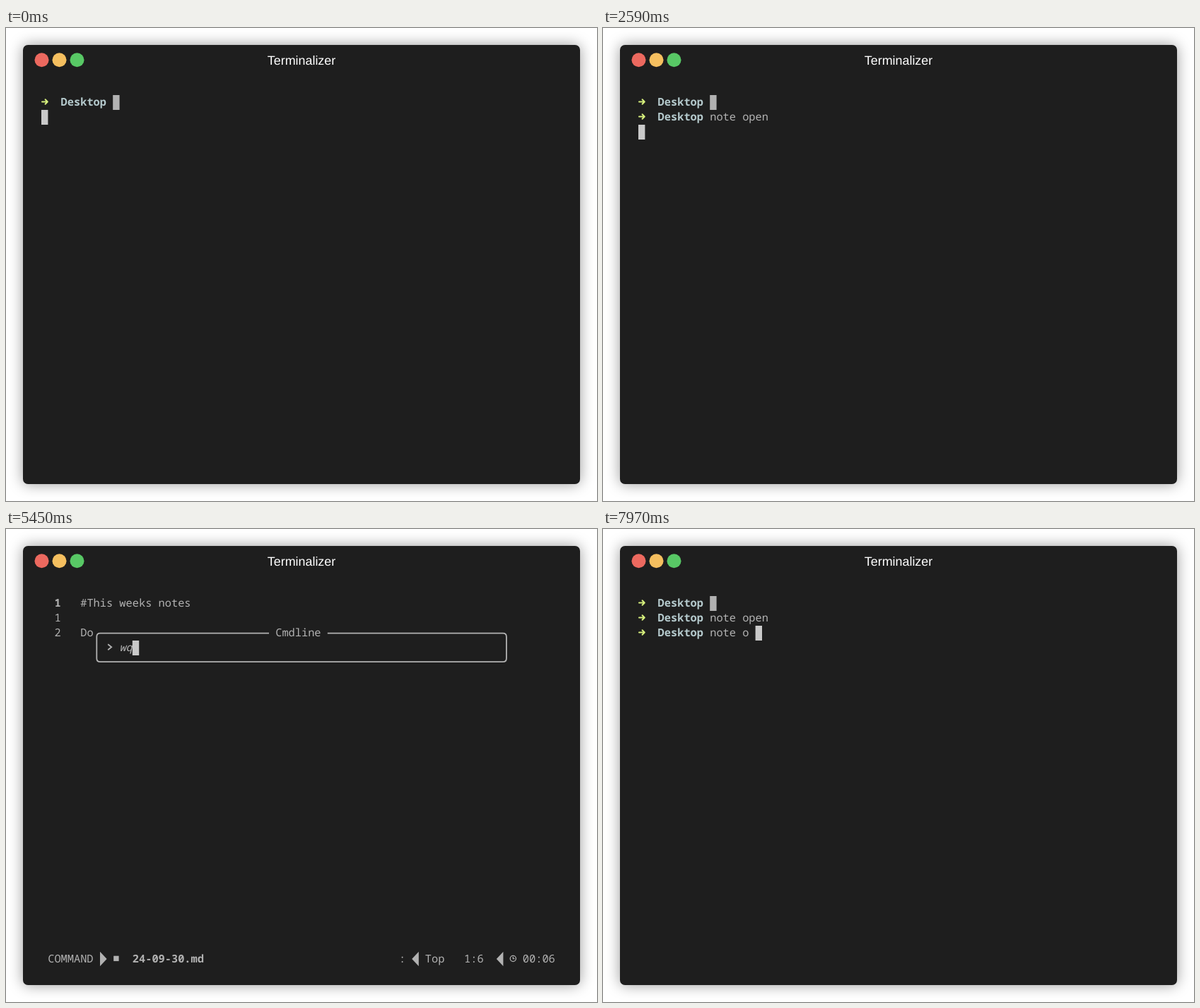
Write an HTML page that moves like this. It is 836 px wide and 670 px high and loops after 8 s.

```html
<!DOCTYPE html>
<html lang="en">
<head>
<meta charset="utf-8">
<title>Terminal notes</title>
<style>
  html, body { margin: 0; width: 100%; height: 100%; overflow: hidden; background: #fff; }
  .window {
    position: absolute; left: 24px; top: 24px; width: 788px; height: 622px;
    border-radius: 7px; background: #1e1e1e; box-shadow: 0 0 20px rgba(0, 0, 0, .4);
  }
  svg { position: absolute; left: 0; top: 0; display: block; }
  text { white-space: pre; text-rendering: geometricPrecision; }
  .title { font: 17.9px "Liberation Sans", Arial, sans-serif; fill: #fff; text-anchor: middle; }
  #screen { font: 15.33px "Noto Sans Mono", "DejaVu Sans Mono", monospace; fill: #b2b2b2; }
  .bold { font-weight: 700; }
  .italic { font-style: italic; }
  .dir { font-weight: 700; fill: #b5cacd; }
  .dark { fill: #1e1e1e; }
  .arrow { fill: none; stroke: #d5ee7c; stroke-width: 2; stroke-linecap: round; stroke-linejoin: round; }
  .line { fill: none; stroke: #b2b2b2; stroke-width: 1.8; }
  .thin { fill: none; stroke: #b2b2b2; stroke-width: 1.3; }
</style>
</head>
<body>
<div class="window"></div>
<svg width="836" height="670" viewBox="0 0 836 670">
  <circle cx="50.5" cy="45.3" r="10" fill="#ec695f"/>
  <circle cx="75.5" cy="45.3" r="10" fill="#f5bf5f"/>
  <circle cx="100.5" cy="45.3" r="10" fill="#58c865"/>
  <text class="title" x="418" y="52">Terminalizer</text>
  <g id="screen"></g>
</svg>
<script>
const LOOP = 8000, CELL = 9.2, ROW = 21, LEFT = 50, TOP = 95, STATUS_ROW = 24;
const screen = document.getElementById('screen');

const px = col => LEFT + col * CELL;
const py = row => TOP + row * ROW;

const text = (col, row, str, cls = '') =>
  `<text class="${cls}" x="${px(col)}" y="${py(row) + 14.8}">${str}</text>`;
const block = (col, row, fill = '#c9c9c9') =>
  `<rect x="${px(col)}" y="${py(row)}" width="9.4" height="21" fill="${fill}"/>`;
const path = (cls, d) => `<path class="${cls}" d="${d}"/>`;

// Number of key times already reached
const count = (t, times) => times.filter(k => t >= k).length;

function prompt(row) {
  const x = px(0), y = py(row) + 9.5;
  return path('arrow', `M${x + 1} ${y}H${x + 8.4}M${x + 5.6} ${y - 3.2}L${x + 8.8} ${y}L${x + 5.6} ${y + 3.2}`)
    + text(3, row, 'Desktop', 'dir');
}

function typed(row, str, cursor) {
  return prompt(row) + text(11, row, str) + (cursor ? block(11 + str.length, row) : '');
}

function shell(t) {
  const first = 'note open'.slice(0, count(t, [680, 770, 860, 950, 1040, 1910, 1990, 2100, 2210]));
  const second = 'note o '.slice(0, count(t, [6730, 6820, 6910, 7010, 7260, 7540, 7970]));
  let out = prompt(0) + block(11, 0, '#b2b2b2');
  if (t < 100) return out + block(0, 1);
  out += typed(1, first, t < 2590);
  if (t >= 5780) out += typed(2, second, true);
  else if (t >= 2590) out += block(0, 2);
  return out;
}

function wedge(col, dir) {
  const x = px(col) + (dir > 0 ? 0.2 : 9.4), y = py(STATUS_ROW) - 0.3;
  return path('', `M${x} ${y}l${dir * 9.6} 10.3l${-dir * 9.6} 10.3z`);
}

function statusLine(mode, keys, col) {
  const m = 1 + mode.length, y = py(STATUS_ROW) + 9.5, cx = px(72) + 4.9;
  return text(1, STATUS_ROW, mode) + wedge(m + 1, 1)
    + `<rect x="${px(m + 3) + 1}" y="${y - 3.8}" width="7.4" height="7.4"/>`
    + text(m + 6, STATUS_ROW, '24-09-30.md', 'bold')
    + text(56 - keys.length, STATUS_ROW, keys) + wedge(57, -1)
    + text(59, STATUS_ROW, 'Top') + text(65, STATUS_ROW, '1:' + col) + wedge(70, -1)
    + `<circle class="thin" cx="${cx}" cy="${y}" r="4.1"/>`
    + path('thin', `M${cx} ${y - 2.4}v2.6h2`)
    + text(74, STATUS_ROW, '00:06');
}

function cmdline(cmd) {
  const l = px(8) + 4.7, r = px(71) + 4.7, t = py(2) + 10.7, b = py(4) + 9.2, q = 5;
  const cx = px(10) + 2.2, cy = py(3) + 9.2;
  return `<rect class="dark" x="${px(8)}" y="${py(2)}" width="${64 * CELL}" height="${3 * ROW}"/>`
    + path('line', `M${px(35)} ${t}H${l + q}q${-q} 0 ${-q} ${q}V${b - q}q0 ${q} ${q} ${q}`
      + `H${r - q}q${q} 0 ${q} ${-q}V${t + q}q0 ${-q} ${-q} ${-q}H${px(44)}`)
    + text(36, 2, 'Cmdline')
    + path('line', `M${cx} ${cy - 4}l5 4l-5 4`)
    + text(12, 3, cmd, 'italic') + block(12 + cmd.length, 3);
}

function editor(t) {
  if (t < 2690) return block(0, 0);
  const title = '#This weeks notes';
  const col = 1 + count(t, [3760, 4040, 4180, 4330, 4470]);
  const command = t >= 5150 && t < 5660;
  const popup = t >= 5180 && t < 5660;
  let out = text(2, 0, '1', 'bold') + text(6, 0, title)
    + text(2, 1, '1')
    + text(2, 2, '2') + text(6, 2, 'Do all my work before its too latee');
  if (popup) out += cmdline('wq'.slice(0, count(t, [5300, 5450])));
  else out += block(5 + col, 0) + text(5 + col, 0, title[col - 1], 'dark');
  if (t >= 2750) {
    const keys = command ? ':' : t >= 3760 && t < 3940 ? '~@k' : '';
    out += statusLine(command ? 'COMMAND' : 'NORMAL', keys, col);
  }
  return out;
}

let shown = null;
function draw() {
  const t = performance.now() % LOOP;
  const next = t >= 2620 && t < 5720 ? editor(t) : shell(t);
  if (next !== shown) screen.innerHTML = shown = next;
  requestAnimationFrame(draw);
}
draw();
</script>
</body>
</html>
```
